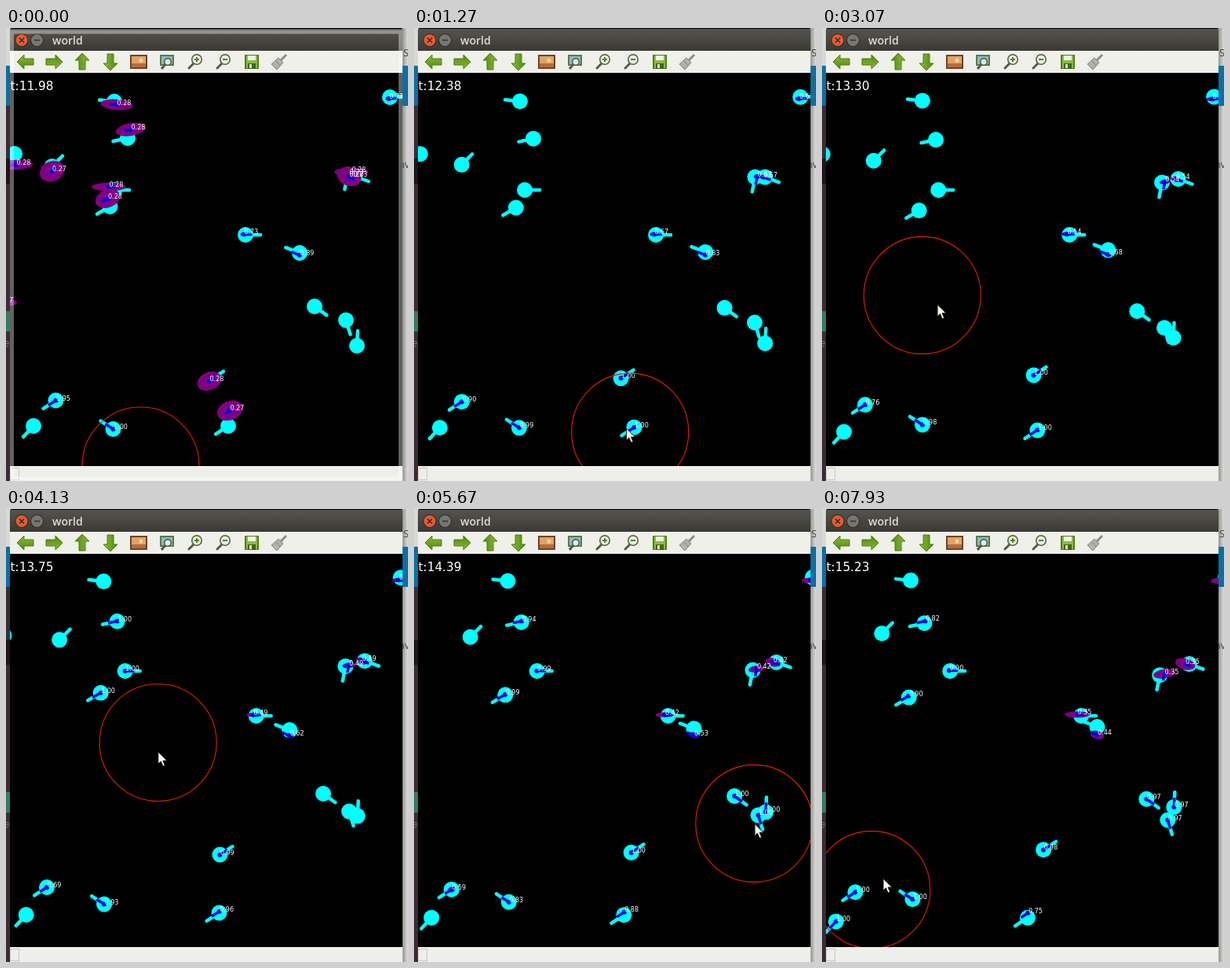
Write an HTML page with a canvas that moves like this. It is 512x576 px and loops after 8 s.

```html
<!DOCTYPE html>
<html lang="en">
<head>
<meta charset="utf-8">
<title>world</title>
<style>
html, body { margin: 0; width: 100%; height: 100%; overflow: hidden; background: #000; }
canvas { display: block; }
</style>
</head>
<body>
<canvas id="stage" width="512" height="576"></canvas>
<script>
const ctx = document.getElementById('stage').getContext('2d');
const LOOP = 8000, FRAMES = 120, STEP = LOOP / FRAMES;
const PANE = [5, 57, 500, 500];
const RANGE = 74.5, SPEED = 7.75, MAX_AGE = 6.88, UNKNOWN = 99;
const CYAN = '#00ffff', BLUE = '#0000e6';
const UI_FONT = '"Open Sans", "Noto Sans", sans-serif';
const PLOT_FONT = '"DejaVu Sans", sans-serif';

// Key points: [ms, simulated seconds] and [ms, x, y].
const CLOCK = [[0, 11.98], [1270, 12.38], [3070, 13.3], [5670, 14.39], [LOOP, 15.25]];
const MOUSE = [[0, 171.5, 556.5], [1270, 275.5, 513.5], [1400, 267, 506], [2130, 203, 508],
  [2700, 265, 490], [3070, 126.5, 338.5], [3400, 215, 395], [3700, 150, 205], [3900, 193, 262],
  [4260, 194, 316], [4850, 150, 215], [5250, 260, 370], [5450, 355, 362], [5670, 434.5, 400.5],
  [6450, 430, 400], [6600, 310, 400], [6760, 194, 332], [7100, 187, 325], [7880, 53, 494],
  [8010, 78, 470]];

// Start, heading in degrees, seconds since last sighting, estimate error when stale.
const bot = (x, y, deg, age = UNKNOWN, dx = 0, dy = 0) => {
  const h = deg * Math.PI / 180;
  return { x, y, ux: Math.cos(h), uy: Math.sin(h), age, dx, dy, bend: Math.sin(2 * h) };
};
const ghost = (...args) => ({ ...bot(...args), ghost: true });
const BOTS = [
  bot(138, 93.5, 186, 6.5, 3, 4),
  bot(155, 140, 168, 6.5, 4, -11),
  bot(11, 160, 177, 6.5, 2, 14),
  bot(58.5, 176, -45, 6.7, 0, 6),
  bot(138, 206, 0, 6.5, -7, -4),
  bot(132.5, 227, 150, 6.5, -3, -10),
  bot(305, 263, 0, 2.2, -6, -2),
  bot(374, 286, 201, 1.2, 0, 15),
  bot(393, 354, 36),
  bot(433, 371.5, 73),
  bot(447, 404, -87),
  bot(435, 186.5, 101, 2.2, 7, -2),
  bot(444, 188.5, 20, 2.2, -6, 0),
  bot(489, 88, -3, 2.2, -4, 5),
  bot(261, 447, -33, 6.5, -2, 2),
  bot(283, 506, 147, 6.7, 2, -19),
  bot(63.5, 473.5, 147, 0.73),
  bot(136.5, 510, 213, 0),
  bot(35, 506, 133),
  ghost(440, 183, 0, 6.5),
  ghost(437, 189, 35, 6.5),
  ghost(-9, 349, 180, 6.7)
];

function sample(rows, t) {
  let i = 0;
  while (i < rows.length - 2 && rows[i + 1][0] <= t) i++;
  const a = rows[i], b = rows[i + 1];
  const k = Math.max(0, Math.min(1, (t - a[0]) / (b[0] - a[0])));
  return a.slice(1).map((v, n) => v + (b[n + 1] - v) * k);
}
const simTime = t => sample(CLOCK, t)[0];

function place(b, now) {
  const travel = b.ghost ? 0 : SPEED * (now - CLOCK[0][1]);
  return [b.x + b.ux * travel, b.y + b.uy * travel];
}
function guess(b, [x, y], age) {
  return [x + b.dx * age / 6.5, y + b.dy * age / 6.5];
}

// Ages of all estimates per frame: a sighting resets one, an empty spot or old age drops it.
function simulate() {
  const history = [];
  let ages = BOTS.map(b => b.age), before = simTime(0);
  for (let f = 0; f < FRAMES; f++) {
    const now = simTime(f * STEP), [mx, my] = sample(MOUSE, f * STEP);
    const inside = ([x, y]) => Math.hypot(x - mx, y - my) < RANGE;
    ages = ages.map((old, i) => {
      const b = BOTS[i], pos = place(b, now), age = old + now - before;
      if (!b.ghost && inside(pos)) return 0;
      return age > MAX_AGE || inside(guess(b, pos, age)) ? UNKNOWN : age;
    });
    history.push(ages);
    before = now;
  }
  return history;
}
const HISTORY = simulate();

function rect(color, x, y, w, h) {
  ctx.fillStyle = color;
  ctx.fillRect(x, y, w, h);
}
function disc(color, x, y, r) {
  ctx.fillStyle = color;
  ctx.beginPath();
  ctx.arc(x, y, r, 0, 7);
  ctx.fill();
}
function line(color, width, ...p) {
  ctx.strokeStyle = color;
  ctx.lineWidth = width;
  ctx.beginPath();
  for (let i = 0; i < p.length; i += 2) ctx.lineTo(p[i], p[i + 1]);
  ctx.stroke();
}
function shape(fill, stroke, ...p) {
  ctx.beginPath();
  for (let i = 0; i < p.length; i += 2) ctx.lineTo(p[i], p[i + 1]);
  ctx.closePath();
  ctx.fillStyle = fill;
  ctx.fill();
  ctx.strokeStyle = stroke;
  ctx.lineWidth = 1;
  ctx.stroke();
}
function text(str, x, y, font, color) {
  ctx.font = font;
  ctx.fillStyle = color;
  ctx.fillText(str, x, y);
}
function gradient(x1, y1, from, to, x0 = 0, y0 = 0) {
  const g = ctx.createLinearGradient(x0, y0, x1, y1);
  g.addColorStop(0, from);
  g.addColorStop(1, to);
  return g;
}
function at(x, y, turn, draw) {
  ctx.save();
  ctx.translate(x, y);
  ctx.rotate(turn);
  draw();
  ctx.restore();
}

function desktop() {
  rect('#3c2c38', 0, 0, 6, 576);
  rect('#d8d8d4', 0, 0, 6, 48);
  rect('#0870a4', 0, 48, 6, 51);
  rect('#20141c', 0, 166, 6, 32);
  rect('#307c68', 0, 360, 6, 26);
  text('e', -3, 405, '13px ' + UI_FONT, '#847480');
  rect(gradient(512, 0, '#8c8c88', '#dcdcd8', 504), 504, 0, 8, 576);
  rect('#0870a4', 504, 48, 8, 51);
  text('S', 506, 36, '13px ' + UI_FONT, '#40403c');
  text('av', 501, 178, '12px ' + UI_FONT, '#40403c');
}

function titleButton(x, color) {
  disc('#2c2b28', x, 15.5, 8.5);
  disc(color, x, 15.5, 7.5);
}
function titleBar() {
  rect(gradient(0, 29, '#56554f', '#3a3935'), 5, 1, 500, 29);
  titleButton(20, '#e45c30');
  line('#50200c', 1.6, 17, 12.5, 23, 18.5);
  line('#50200c', 1.6, 23, 12.5, 17, 18.5);
  titleButton(39.5, '#78766e');
  line('#343330', 1.6, 36, 15.5, 43, 15.5);
  text('world', 59, 20.5, '600 14px ' + UI_FONT, '#dfdbd2');
}

function arrow(x, turn) {
  at(x, 43, turn, () => shape(gradient(0, 9, '#8cbc2c', '#4c8c14', 0, -9), '#4a7c14',
    -11, 0, -2, -9, -2, -4, 10, -4, 10, 4, -2, 4, -2, 9));
}
function lens(x, mark) {
  at(x, 43, 0, () => {
    ctx.lineCap = 'round';
    line('#58584c', 3, -2, 2, -8, 8);
    ctx.lineCap = 'butt';
    disc('#4c5c3c', 2, -3, 7);
    disc('#e8eee0', 2, -3, 5.5);
    mark();
  });
}

function toolbar() {
  rect('#f0f0ea', 5, 29, 500, 28);
  [0, 2, 1, 3].forEach((quarter, i) => arrow(25 + 36 * i, quarter * Math.PI / 2));

  rect('#704424', 158, 34, 22, 18);
  rect('#e0a468', 160, 36, 18, 14);
  rect('#b86c38', 160, 45, 18, 5);
  disc('#f4d898', 172, 41, 2.5);

  rect('#54803c', 196, 34, 18, 14);
  rect('#90b4d0', 198, 36, 14, 10);
  line('#58584c', 3, 203, 46, 198, 52);
  disc('#4c5c3c', 206, 43, 5);
  disc('#dcecf0', 206, 43, 3.5);

  const minus = () => line('#4c8c18', 2, -1, -3, 5, -3);
  lens(241, () => { minus(); line('#4c8c18', 2, 2, -6, 2, 0); });
  lens(277, minus);

  rect('#4c8018', 304, 34, 18, 18);
  rect('#8cbc40', 306, 35, 14, 16);
  rect('#f0f0e8', 308, 35, 10, 6);
  rect('#3c6814', 308, 45, 10, 7);
  rect('#dce8d0', 310, 46, 3, 5);

  line('#908c88', 3, 357, 34, 350, 41);
  shape('#b4b0ac', '#848078', 347, 38, 353, 44, 345, 53, 338, 46);
  line('#848078', 1, 344, 42, 349, 48);
}

function statusBar() {
  rect('#eeeeea', 5, 557, 500, 19);
  ctx.strokeStyle = '#c8c8c0';
  ctx.lineWidth = 1;
  ctx.strokeRect(5.5, 559.5, 11, 15);
}

function focusFrame(t) {
  const alpha = Math.max(0, 0.38 * (1 - t / 270));
  ctx.strokeStyle = `rgba(255, 255, 255, ${alpha})`;
  ctx.lineWidth = 5;
  ctx.strokeRect(7.5, 5, 495, 568);
}

function robot(b, [x, y]) {
  disc(CYAN, x, y, 10);
  ctx.lineCap = 'round';
  line(CYAN, 4.5, x, y, x + b.ux * 19, y + b.uy * 19);
  ctx.lineCap = 'butt';
}

function estimate(b, pos, age) {
  const [x, y] = guess(b, pos, age);
  const stale = Math.max(0, Math.min(1, (age - 2.5) / 2));
  const spread = 2 + 0.47 * age * age, skew = Math.abs(b.bend);
  const rx = spread * (1 - 0.3 * skew), ry = spread * (0.25 + 0.3 * skew);
  ctx.fillStyle = `rgb(${128 * stale}, 0, ${230 - 102 * stale})`;
  ctx.beginPath();
  ctx.ellipse(x, y, rx, Math.max(2.5, ry), b.bend * 0.42, 0, 7);
  ctx.fill();
  disc(BLUE, x, y, 3);
  const reach = 12 - age * 0.6;
  line(BLUE, 3.5, x, y, x + b.ux * reach, y + b.uy * reach);
}

function label(b, pos, age) {
  const [x, y] = guess(b, pos, age);
  const confidence = 1 / (1 + Math.pow(age / 3.85, 1.8));
  text(confidence.toFixed(2), x + 0.5, y, '8px ' + PLOT_FONT, '#fff');
}

function pointer(x, y) {
  at(x, y, 0, () => shape('#fffff4', '#1c1c1c',
    0, 0, 0, 15, 3.4, 11.8, 6, 18, 8.6, 17, 6, 11, 11, 11));
}

function world(frame) {
  const t = frame * STEP, now = simTime(t), ages = HISTORY[frame];
  const places = BOTS.map(b => place(b, now));
  const eachKnown = draw => BOTS.forEach((b, i) => {
    if (ages[i] < UNKNOWN) draw(b, places[i], ages[i]);
  });
  ctx.save();
  ctx.beginPath();
  ctx.rect(...PANE);
  ctx.clip();
  rect('#000', ...PANE);

  BOTS.forEach((b, i) => b.ghost || robot(b, places[i]));
  eachKnown(estimate);
  eachKnown(label);

  ctx.strokeStyle = '#e61e00';
  ctx.lineWidth = 1.1;
  ctx.beginPath();
  ctx.arc(...sample(MOUSE, t), RANGE, 0, 7);
  ctx.stroke();
  text('t:' + now.toFixed(2), 5.5, 78.5, '15.3px ' + PLOT_FONT, '#fff');
  ctx.restore();

  // The sensor ring trails the pointer slightly.
  if (t > 300) pointer(...sample(MOUSE, t + 80));
}

function draw(t) {
  const frame = Math.min(FRAMES - 1, Math.floor((t + 5) / STEP));
  desktop();
  titleBar();
  toolbar();
  statusBar();
  world(frame);
  focusFrame(frame * STEP);
}

const start = performance.now();
function tick() {
  draw((performance.now() - start) % LOOP);
  requestAnimationFrame(tick);
}
tick();
</script>
</body>
</html>
```
